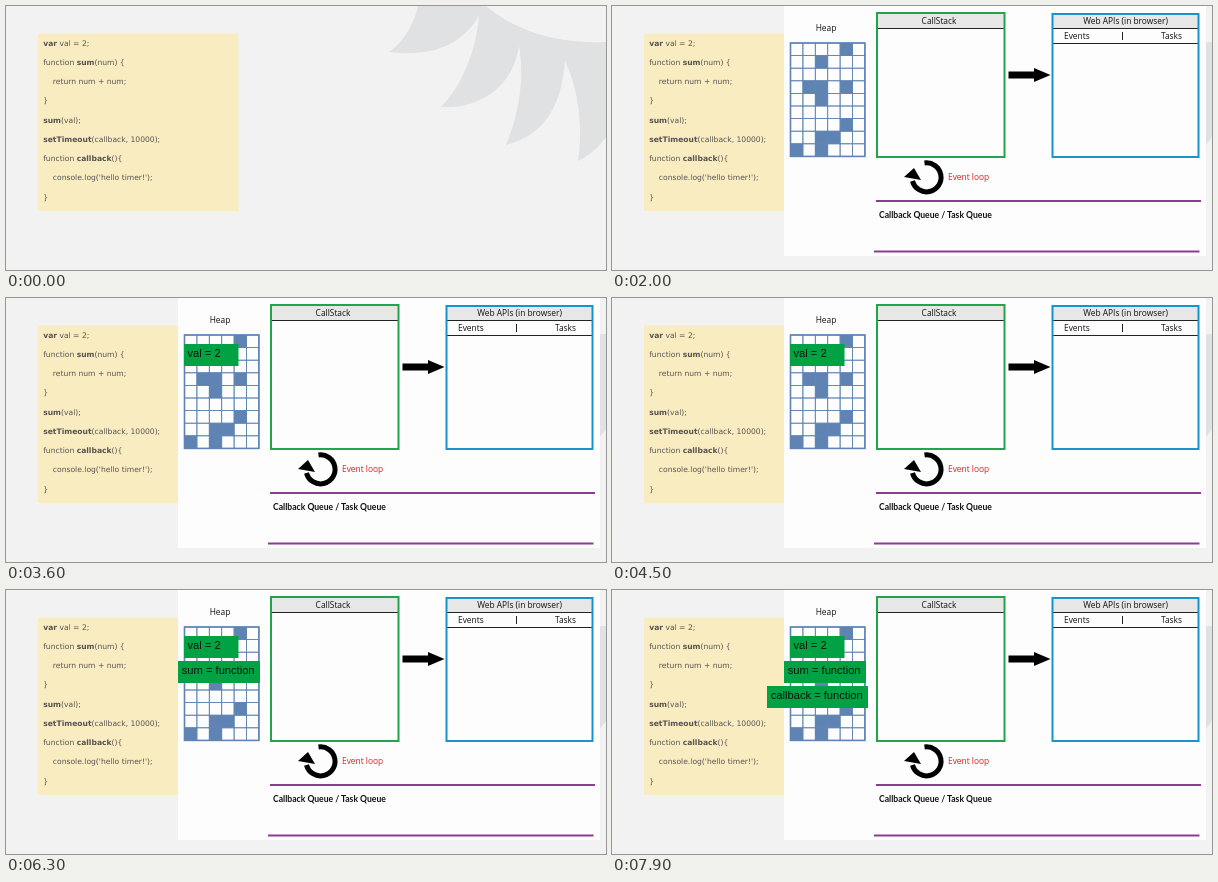
An HTML page that plays this animation: 600x264 px, repeating every 8000 ms.

```html
<!DOCTYPE html>
<html lang="en">
<head>
<meta charset="utf-8">
<title>Event loop</title>
<style>
html, body { margin: 0; width: 100%; height: 100%; overflow: hidden; background: #f2f2f2; }
svg { display: block; width: 600px; height: 264px; }
text { white-space: pre; }
#code { font: 7.6px "DejaVu Sans", sans-serif; fill: #555350; }
#diagram { font: 8.4px "Open Sans", sans-serif; fill: #111; }
.mid { text-anchor: middle; }
.label { font: 11.15px "Liberation Sans", Arial, sans-serif; fill: #06140a; }
.b { font-weight: bold; }
</style>
</head>
<body>
<svg viewBox="0 0 600 264">
  <rect width="600" height="264" fill="#f2f2f2"/>
  <path fill="#dfe1e3" d="M412 0C409 15 398 36 383 46C425 51 455 40 473 10C470 45 456 80 435 101C475 103 507 80 513 40C519 75 512 110 500 139C535 130 555 105 559 55C573 85 577 120 572 155C584 149 593 141 600 131V36C550 38 510 25 480 0Z"/>
  <rect x="32" y="27.5" width="200.5" height="177.5" fill="#faecc1"/>
  <g id="code"></g>

  <g id="diagram">
    <rect x="172" width="422" height="250" fill="#fdfdfd"/>
    <text class="mid" x="214" y="25">Heap</text>
    <g id="heap" fill="#5f84b3" stroke="#5f84b3"></g>

    <rect x="265" y="7" width="127.5" height="15.5" fill="#e7e7e7"/>
    <rect x="440.5" y="8" width="146" height="14.5" fill="#e7e7e7"/>
    <path d="M265 22.5H392M441 22.5H587M441 37.5H587M510.5 26V34" stroke="#222" fill="none"/>
    <rect x="265" y="7" width="127.5" height="144" fill="none" stroke="#22a44a" stroke-width="2"/>
    <rect x="440.5" y="8" width="146" height="143" fill="none" stroke="#1794cb" stroke-width="2"/>
    <text class="mid" x="327" y="18">CallStack</text>
    <text class="mid" x="513.5" y="18">Web APIs (in browser)</text>
    <text x="452" y="33">Events</text>
    <text x="549" y="33">Tasks</text>

    <path fill="#000" d="M396.5 65.5H422V62L438.5 69L422 76V72.5H396.5Z"/>
    <path d="M312.5 157A14.5 14.5 0 1 1 300.5 175" fill="none" stroke="#000" stroke-width="5"/>
    <path fill="#000" d="M292 171L302 162L309 174Z"/>
    <text x="336" y="174" fill="#e01b24">Event loop</text>

    <path d="M264 195H589M262 245.5H587.5" stroke="#8d3b94" stroke-width="2"/>
    <text class="b" x="267" y="212" style="font-family:Lato,sans-serif;font-size:8.6px">Callback Queue / Task Queue</text>
  </g>

  <g id="labels"></g>
</svg>
<script>
const LOOP = 8000;
const $ = id => document.getElementById(id);

// Asterisks mark bold words.
const code = [
  '*var* val = 2;', 'function *sum*(num) {', '    return num + num;', '}',
  '*sum*(val);', '*setTimeout*(callback, 10000);',
  'function *callback*(){', "    console.log('hello timer!');", '}'
];
$('code').innerHTML = code.map((line, i) =>
  `<text x="37.2" y="${39.7 + i * 19.25}">${line.replace(/\*(\w+)\*/, '<tspan class="b">$1</tspan>')}</text>`
).join('');

// Heap memory grid: '#' is a used cell.
const cells = ['....#.', '..#...', '......', '.##.#.', '..#...', '......', '....#.', '..##..', '#.#...'];
const left = 178.5, top0 = 37, cw = 12.4, ch = 12.6;
let grid = '';
cells.forEach((row, r) => [...row].forEach((c, k) => {
  grid += `<rect x="${left + k * cw}" y="${top0 + r * ch}" width="${cw}" height="${ch}" stroke-width=".8" fill="${c === '#' ? '#5f84b3' : 'none'}"/>`;
}));
grid += `<rect x="${left}" y="${top0}" width="${6 * cw}" height="${9 * ch}" fill="none" stroke-width="1.6"/>`;
$('heap').innerHTML = grid;

const labels = [
  { text: 'val = 2', x: 178, y: 46, w: 54.5, tx: 181.5, at: 3600 },
  { text: 'sum = function', x: 172, y: 71, w: 82, tx: 175.8, at: 5100 },
  { text: 'callback = function', x: 155, y: 96, w: 101, tx: 158.8, at: 7500 }
];
$('labels').innerHTML = labels.map(l =>
  `<g><rect x="${l.x}" y="${l.y}" width="${l.w}" height="22" fill="#00a244"/>
   <text class="label" x="${l.tx}" y="${l.y + 13.2}">${l.text}</text></g>`
).join('');

const cues = [[$('diagram'), 1400], ...labels.map((l, i) => [$('labels').children[i], l.at])];

function draw() {
  const t = performance.now() % LOOP;
  for (const [el, at] of cues) el.style.visibility = t >= at ? 'visible' : 'hidden';
  requestAnimationFrame(draw);
}
draw();
</script>
</body>
</html>
```
